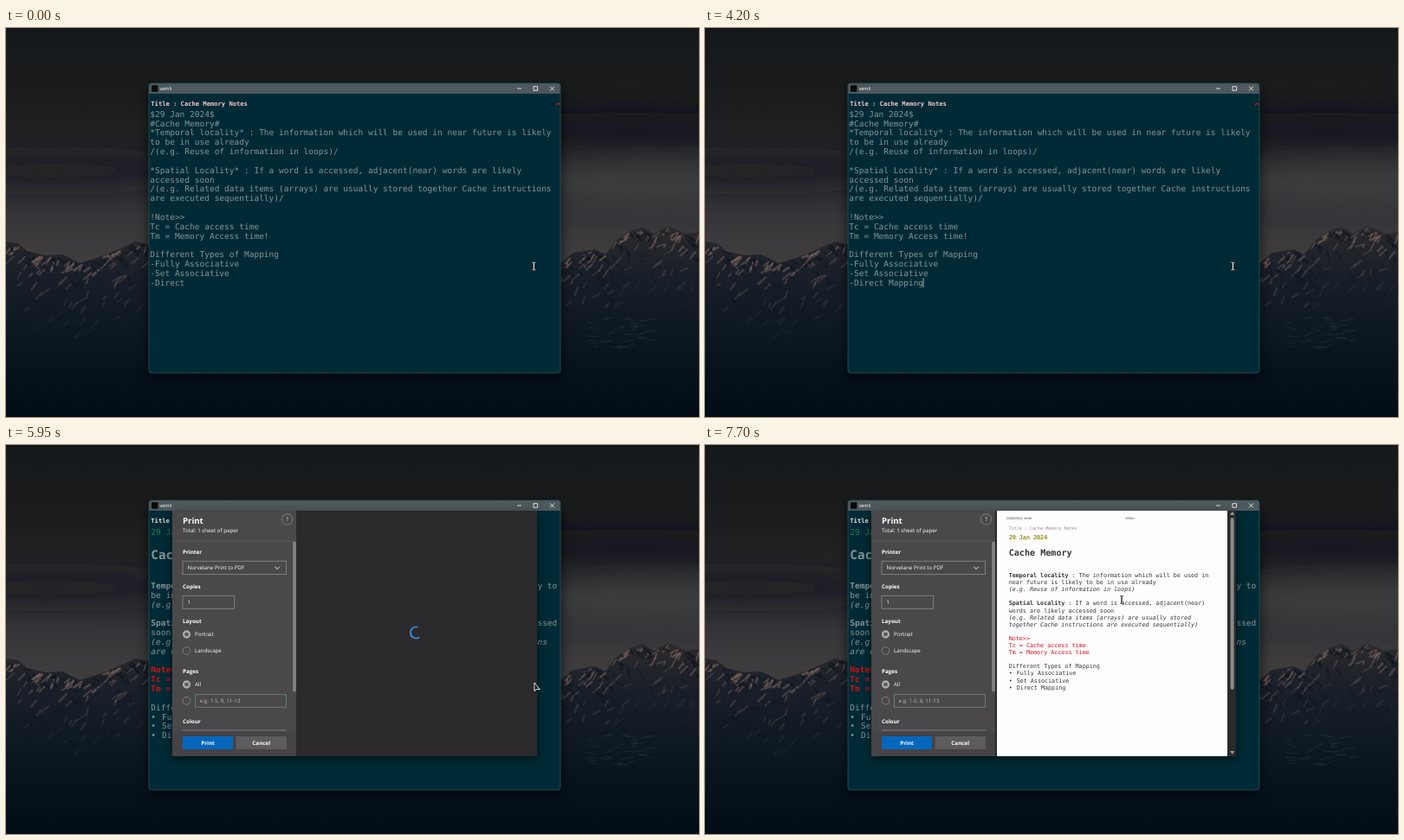
Recreate the animation shown at these times as an HTML page. Size 800 px wide and 450 px high, loop 8 s.

```html
<!DOCTYPE html>
<html lang="en">
<head>
<meta charset="utf-8">
<title>Notes</title>
<style>
html, body { margin: 0; width: 100%; height: 100%; overflow: hidden; background: #0b1118; }
svg { display: block; width: 100vw; height: 100vh; }
text { text-rendering: geometricPrecision; white-space: pre; }
.mono { font-family: "DejaVu Sans Mono", monospace; }
.ui { font-family: "Open Sans", sans-serif; fill: #fff; }
.b { font-weight: bold; }
.i { font-style: italic; }
.red { fill: var(--red); font-weight: var(--redWeight); }
</style>
</head>
<body>
<svg id="stage" viewBox="0 0 800 450">
  <defs>
    <linearGradient id="sky" x2="0" y2="1">
      <stop offset="0" stop-color="#15181a"/>
      <stop offset=".22" stop-color="#1c1e20"/>
      <stop offset=".36" stop-color="#28292c"/>
      <stop offset=".5" stop-color="#37373b"/>
      <stop offset=".58" stop-color="#3f3c3d"/>
    </linearGradient>
    <linearGradient id="rock" gradientUnits="userSpaceOnUse" x1="0" x2="0" y1="228" y2="450">
      <stop offset="0" stop-color="#2d2b2d"/>
      <stop offset=".22" stop-color="#1b2029"/>
      <stop offset=".5" stop-color="#0f1924"/>
      <stop offset=".8" stop-color="#06111b"/>
      <stop offset="1" stop-color="#030d16"/>
    </linearGradient>
    <filter id="soft" x="-50%" y="-50%" width="200%" height="200%"><feGaussianBlur stdDeviation="14"/></filter>
  </defs>
</svg>
<script>
const LOOP = 8000;
const stage = document.getElementById('stage');
const clamp = v => Math.max(0, Math.min(1, v));
const within = (t, spans) => spans.some(([a, b]) => t >= a && t < b);
let seed = 11;
const rand = () => (seed = seed * 16807 % 2147483647) / 2147483647;

const text = (x, y, size, str, attrs = '') => `<text x="${x}" y="${y}" font-size="${size}" ${attrs}>${str}</text>`;
const rect = (x, y, w, h, fill, attrs = '') => `<rect x="${x}" y="${y}" width="${w}" height="${h}" fill="${fill}" ${attrs}/>`;
const line = (d, stroke, width = 1, attrs = '') => `<path d="${d}" fill="none" stroke="${stroke}" stroke-width="${width}" ${attrs}/>`;
const group = (id, body, attrs = '') => `<g id="${id}" ${attrs}>${body}</g>`;

// ---- Wallpaper ----
const ridge = [[0, 247], [14, 249], [24, 258], [45, 263], [65, 262], [85, 272], [105, 266], [125, 258],
  [150, 247], [165, 250], [400, 290], [640, 272], [655, 260], [680, 256], [692, 262], [705, 245],
  [722, 234], [735, 230], [748, 238], [765, 229], [785, 238], [800, 236]];

function ridgeY(x) {
  const i = Math.max(1, ridge.findIndex(p => p[0] >= x));
  const [[x0, y0], [x1, y1]] = [ridge[i - 1], ridge[i]];
  return y0 + (y1 - y0) * (x - x0) / (x1 - x0);
}

function wallpaper() {
  let s = rect(0, 0, 800, 450, 'url(#sky)');
  s += '<g filter="url(#soft)"><ellipse cx="760" cy="178" rx="170" ry="24" fill="#4a4b4e" opacity=".55"/>' +
    '<ellipse cx="720" cy="118" rx="200" ry="20" fill="#141618" opacity=".7"/>' +
    '<ellipse cx="50" cy="165" rx="160" ry="18" fill="#1d2023" opacity=".7"/></g>';
  s += `<path d="M${ridge.join('L')}L800 450H0Z" fill="url(#rock)"/>`;
  for (let k = 0; k < 380; k++) {
    const x = rand() < .5 ? rand() * 165 : 640 + rand() * 160;
    const depth = rand() ** 2 * 100;
    const y = ridgeY(x) + depth + 2;
    const lit = rand() < .5;
    const dx = (lit ? -1 : 1) * (2 + rand() * 9);
    const alpha = (lit ? .5 : .6) * (1 - depth / 105) ** 1.6;
    s += line(`M${x.toFixed(1)} ${y.toFixed(1)}l${dx.toFixed(1)} ${(3 + rand() * 7).toFixed(1)}`,
      lit ? '#8b706a' : '#0c141e', 1 + rand() * 1.8, `opacity="${alpha.toFixed(2)}"`);
  }
  for (let k = 0; k < 36; k++) {
    s += line(`M${670 + rand() * 75} ${335 + rand() * 36}l${5 + rand() * 10} ${rand() * 5 - 3}`, '#6c7580', .7, 'opacity=".25"');
  }
  return s;
}

// ---- Notes ----
const notes = [
  '*Temporal locality* : The information which will be used in near future is likely to be in use already',
  '/(e.g. Reuse of information in loops)/', '',
  '*Spatial Locality* : If a word is accessed, adjacent(near) words are likely accessed soon',
  '/(e.g. Related data items (arrays) are usually stored together Cache instructions are executed sequentially)/', '',
  '!Note>>', 'Tc = Cache access time', 'Tm = Memory Access time!', '',
  'Different Types of Mapping', '-Fully Associative', '-Set Associative', '-Direct Mapping'];

function wrap(str, cols) {
  const rows = [''];
  for (const word of str.split(' ')) {
    const last = rows.length - 1;
    const joined = rows[last] ? rows[last] + ' ' + word : word;
    if (joined.length > cols) rows.push(word);
    else rows[last] = joined;
  }
  return rows;
}

// Turns the markup into styled lines
function styled(x, y, size, step, cols) {
  let out = '', red = false;
  for (const para of notes) {
    if (para[0] === '!') red = true;
    const cls = red ? 'red' : para[0] === '/' ? 'i' : '';
    const bold = (para.match(/^\*(.*)\*/) || [])[1];
    const bullet = para[0] === '-';
    if (bullet) out += text(x, y, size, '•');
    for (const row of wrap(para.replace(/^-|[*!/]/g, ''), cols)) {
      const body = bold && row.startsWith(bold) ? `<tspan class="b">${bold}</tspan>${row.slice(bold.length)}` : row;
      out += text(x + (bullet ? size * 1.33 : 0), y, size, body, `class="${cls}"`);
      y += step;
    }
    if (para.endsWith('!')) red = false;
  }
  return out;
}

const SIZE = 9.5, STEP = 10.83, CHAR = SIZE * .602, LEFT = 166.3;
const TITLE = 'Title : Cache Memory Notes';

function editor() {
  const rows = ['$29 Jan 2024$', '#Cache Memory#', ...notes.slice(0, -1).flatMap(p => wrap(p, 81))];
  return text(167.3, 90, 7.13, TITLE, 'class="b" fill="#f6c9c6"') +
    rows.map((r, i) => text(LEFT, 102.8 + i * STEP, SIZE, r)).join('') +
    text(LEFT, 102.8 + rows.length * STEP, SIZE, '', 'id="typed"') +
    rect(0, 289, .8, 11, '#b9c4c5', 'id="caret"') +
    line('M635 89.3q2.3-3.4 4.6-.6', '#c8141c', 1.2);
}

const rendered = () =>
  text(167.3, 90, 7.13, TITLE, 'class="b" fill="#e9dedc"') +
  group('prose',
    text(167.3, 104, SIZE, '29 Jan 2024', 'fill="#23804c"') +
    text(167.3, 131.8, 14.25, 'Cache Memory', 'class="b"') +
    styled(167.3, 166, SIZE, STEP, 82), 'style="--red:#d90d12;--redWeight:bold"');

const appWindow = () =>
  rect(165, 64, 475, 335, '#002b36', 'rx="3" style="filter:drop-shadow(0 4px 7px #000b)"') +
  '<path d="M165 76V67q0-3 3-3h469q3 0 3 3v9z" fill="#4d595d"/>' +
  rect(165, 64, 475, 335, 'none', 'rx="3" stroke="#2c535c" stroke-width=".8"') +
  rect(168, 66.3, 7.4, 7.4, '#0a0a0a', 'rx="1"') +
  text(177.4, 72, 5.6, 'vemli', 'class="ui"') +
  line('M590 70h5M609 67.7h4.6v4.6h-4.6zM628 67.5l5 5m0-5l-5 5', '#fff', .8);

// ---- Print dialog ----
function printPanel() {
  const edge = 'stroke="#8d8b8c" stroke-width=".8"';
  const label = (y, str) => text(204, y, 6.3, str, 'class="ui b"');
  const value = (x, y, str, attrs = '') => text(x, y, 6.2, str, 'class="ui" ' + attrs);
  const radio = (y, on) => on
    ? `<circle cx="208.5" cy="${y}" r="3.5" fill="#5b595a" stroke="#aaa8a9" stroke-width="2.3"/>`
    : `<circle cx="208.5" cy="${y}" r="4.4" fill="none" ${edge}/>`;
  const button = (x, w, fill, str) => rect(x, 337, w, 15, fill) +
    text(x + w / 2, 346.7, 6.3, str, 'class="ui b" text-anchor="middle"');
  return rect(192, 76, 143, 284, '#4a484a') +
    text(204, 91.3, 9.6, 'Print', 'class="ui b"') +
    value(204, 101.3, 'Total: 1 sheet of paper') +
    `<circle cx="324.5" cy="86" r="6.2" fill="none" ${edge}/>` +
    value(324.5, 88.4, '?', 'text-anchor="middle"') +
    line('M192 111.3h143', '#5e5c5d', .8) +
    rect(331, 112, 4, 173, '#807e7f') +
    label(126.3, 'Printer') + rect(204, 134.3, 119.5, 15.4, 'none', edge) +
    value(209.5, 144.3, 'Norvelane Print to PDF') + line('M310.3 140.7l2.8 2.8 2.8-2.8', '#fff', .9) +
    label(166.3, 'Copies') + rect(204, 174.3, 59.7, 15, 'none', edge) + value(209.5, 184.3, '1') +
    label(206, 'Layout') + radio(219, true) + value(218, 221.3, 'Portrait') +
    radio(238, false) + value(218, 240.2, 'Landscape') +
    label(264, 'Pages') + radio(277, true) + value(218, 279.2, 'All') +
    radio(295.7, false) + rect(218.5, 288.7, 105, 14.6, 'none', 'stroke="#6b8c83" stroke-width=".8"') +
    value(223.7, 298.2, 'e.g. 1-5, 8, 11-13', 'style="fill:#bab8b9"') +
    label(322, 'Colour') + line('M204 330h119.5', '#8d8b8c', .8) +
    rect(192, 331, 143, 29, '#454345') +
    button(204, 58, '#0467bd', 'Print') + button(265.5, 58.5, '#5d5b5d', 'Cancel');
}

function page() {
  const small = 'font-family="Liberation Sans, Arial, sans-serif" fill="#333"';
  return group('sheet', rect(337, 76, 266, 284, '#fffdff') +
    text(348, 85.6, 3.6, '22/02/2024, 19:08', small) + text(485, 85.6, 3.6, 'VEMLI', small) +
    text(350.7, 98, 5.05, TITLE, 'fill="#9c8585"') +
    text(350.7, 108.5, 6.73, '29 Jan 2024', 'id="date"') +
    text(350.7, 127.8, 10.1, 'Cache Memory', 'class="b"') +
    styled(350.7, 153, 6.73, 8.1, 57), 'fill="#32373b" style="--red:#d8101c;--redWeight:normal"') +
    group('bar', rect(603, 76, 10, 284, '#2b2a2b') + rect(606.6, 84, 4, 199, '#8c8a8b', 'rx="2"') +
    '<path d="M606 81l2.7-4 2.7 4zM606 354l2.7 4 2.7-4z" fill="#9a9899"/>');
}

const dialog = () =>
  rect(192, 76, 421, 284, '#fffdff', 'id="blank" style="filter:drop-shadow(0 4px 6px #0008)"') +
  group('print', rect(192, 76, 421, 284, '#2b292b') + printPanel() +
    line('M479.7 219.2A6.6 6.6 0 1 1 471.2 210.8', '#2d8fdc', 1.8, 'id="spinner"') + page());

const pointers = () =>
  '<path id="arrow" d="M0 0V9.6L2.4 7.6H6.2Z" fill="#111" stroke="#fff" stroke-width=".9" stroke-linejoin="round"/>' +
  group('beam', ['#fff', '#111'].map((c, i) =>
    line('M-2-4.3h1.2q.8 0 .8.8v7q0 .8-.8.8h-1.2M2-4.3h-1.2q-.8 0-.8.8v7q0 .8.8.8h1.2', c, i ? .8 : 2, `data-layer="${i}"`)).join(''));

stage.insertAdjacentHTML('beforeend', wallpaper() + appWindow() +
  `<g class="mono" fill="#839496">${group('editor', editor())}${group('rendered', rendered())}${group('dialog', dialog())}</g>` +
  pointers());

const $ = Object.fromEntries([...stage.querySelectorAll('[id]')].map(e => [e.id, e]));
const show = (e, on) => e.setAttribute('display', on ? 'inline' : 'none');
const move = (e, x, y) => e.setAttribute('transform', `translate(${x} ${y})`);

// ---- Motion ----
const keyTimes = [1150, 1850, 2150, 2300, 2600, 2700, 2850];
const caretOn = [[300, 800], [1150, 1700], [1850, 3350], [3850, 4450]];
const PREVIEW = 4700, OPEN = 5800, LOADED = 5950;

function draw(t) {
  const count = keyTimes.filter(k => t >= k).length;
  $.typed.textContent = '-Direct ' + 'Mapping'.slice(0, count);
  $.caret.setAttribute('x', LEFT + (8 + count) * CHAR - .4);
  show($.caret, within(t, caretOn));
  show($.editor, t < PREVIEW);
  show($.rendered, t >= PREVIEW);

  const rise = clamp((t - PREVIEW + 50) / 200);
  move($.prose, 0, 35 * (1 - rise) ** 2);
  $.prose.setAttribute('opacity', rise);

  show($.dialog, t >= OPEN);
  show($.print, t >= LOADED);
  const fade = clamp((t - 6900) / 250);
  show($.spinner, fade === 0);
  $.spinner.setAttribute('transform', `rotate(${(t - 6850) * .36} 473.5 217)`);
  $.sheet.setAttribute('opacity', fade);
  show($.bar, fade > 0);
  $.date.setAttribute('fill', fade < 1 ? '#0b6a32' : '#667022');
  $.date.style.textShadow = fade < 1 ? 'none' : '1px 1px 2px #e6d52a';

  // The pointer crosses the page at the end
  const go = clamp((t - 7350) / 350);
  const ease = go * go * (3 - 2 * go);
  const overText = t < PREVIEW || t >= 7650;
  const x = 610 - 129 * ease, y = 275 - 96 * ease;
  show($.arrow, !overText);
  show($.beam, overText);
  move($.arrow, x, y);
  move($.beam, x - (t < PREVIEW ? .6 : 0), y + (t < PREVIEW ? .5 : 0));
  const onPage = t >= PREVIEW;
  $.beam.firstChild.setAttribute('stroke', onPage ? '#fff' : '#111');
  $.beam.lastChild.setAttribute('stroke', onPage ? '#111' : '#fff');
}

function tick() {
  draw(performance.now() % LOOP);
  requestAnimationFrame(tick);
}
tick();
</script>
</body>
</html>
```
